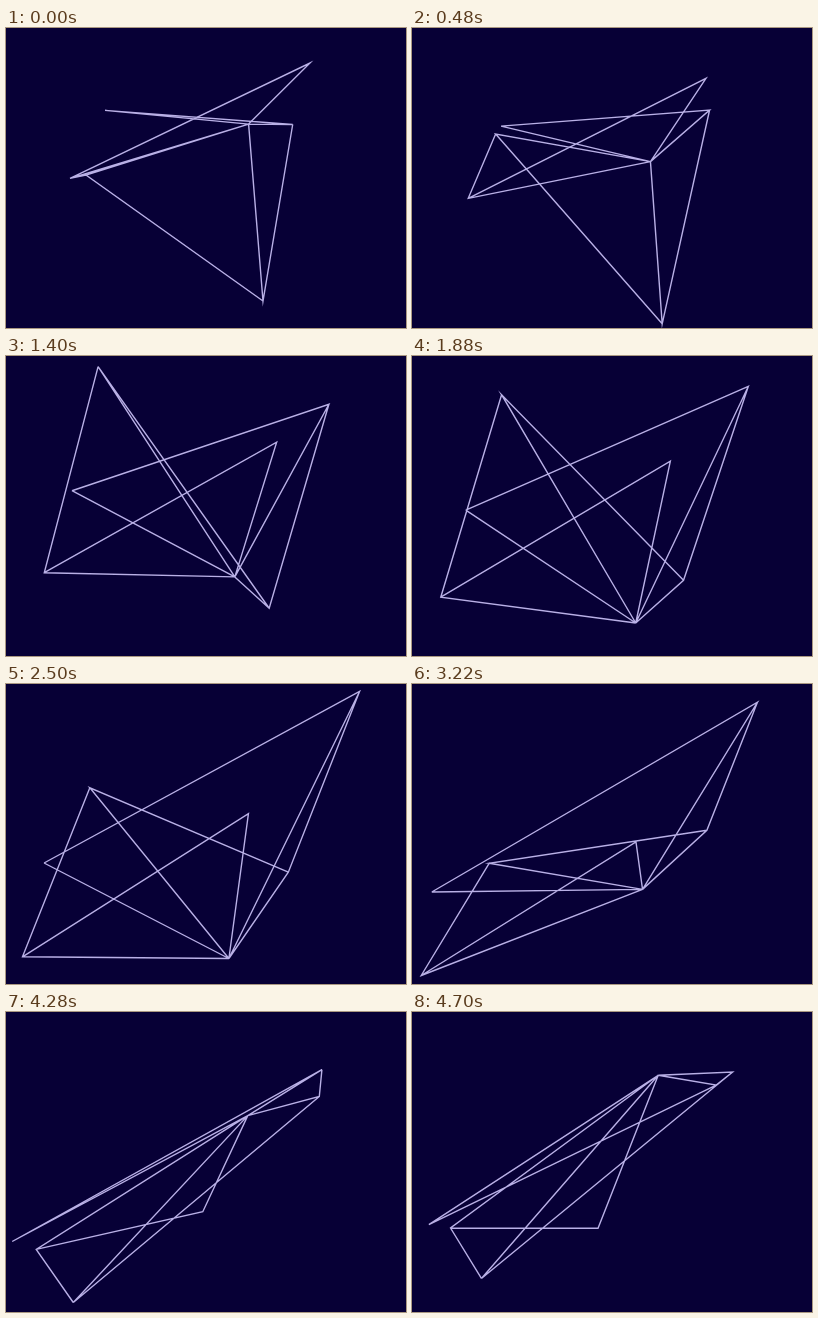
An HTML page with a canvas that plays this animation: 400 px wide and 300 px high, repeating every 4.72 s.

```html
<!DOCTYPE html>
<html lang="en">
<head>
<meta charset="utf-8">
<title>Drifting fan</title>
<style>
  html, body { margin: 0; height: 100%; overflow: hidden; background: #070036; }
  canvas { display: block; }
</style>
</head>
<body>
<canvas id="stage" width="400" height="300"></canvas>
<script>
const W = 400, H = 300, MARGIN = 0.5, LOOP = 4720, TICK = 20;
const ctx = document.getElementById('stage').getContext('2d');

// Steps until a point passes the edge of the stage along (vx, vy).
function exitSteps(x, y, vx, vy) {
  const toWall = (p, v, size) => ((v > 0 ? size - p : p) + MARGIN) / Math.abs(v);
  return Math.min(toWall(x, vx, W), toWall(y, vy, H));
}

// A point that turns straight back along its own line at every wall.
function makePoint(x, y, vx, vy) {
  const ahead = exitSteps(x, y, vx, vy);
  const length = ahead + exitSteps(x, y, -vx, -vy);
  return step => {
    const s = Math.abs(step - ahead) % (2 * length);
    const along = ahead - Math.min(s, 2 * length - s);
    return [x + vx * along, y + vy * along];
  };
}

const hub = makePoint(242.6, 96.1, -0.212, 1.92);
const rim = [
  makePoint(304, 35, -0.513, 0.788),
  makePoint(64, 150.4, -0.396, 1.02),
  makePoint(80, 147, 0.186, -2.098),
  makePoint(257, 273, -0.348, 1.165),
  makePoint(286.7, 96.5, 0.557, -0.742),
  makePoint(99, 82.4, -0.508, 0.805)
];

// The motion starts a little slower, then runs one step per tick.
function stepAt(time) {
  const tick = Math.floor(time / TICK);
  return tick < 27 ? tick * 22 / 27 : tick - 5;
}

function draw(time) {
  const step = stepAt(time);
  const center = hub(step);
  const points = rim.map(point => point(step));

  ctx.fillStyle = '#070036';
  ctx.fillRect(0, 0, W, H);
  ctx.strokeStyle = '#b9b0e6';
  ctx.lineWidth = 1.4;
  ctx.beginPath();
  points.forEach((p, i) => {
    ctx.moveTo(...center);
    ctx.lineTo(...p);
    if (i + 1 < points.length) ctx.lineTo(...points[i + 1]);
  });
  ctx.stroke();
}

const start = performance.now();
function frame() {
  draw((performance.now() - start) % LOOP);
  requestAnimationFrame(frame);
}
frame();
</script>
</body>
</html>
```
